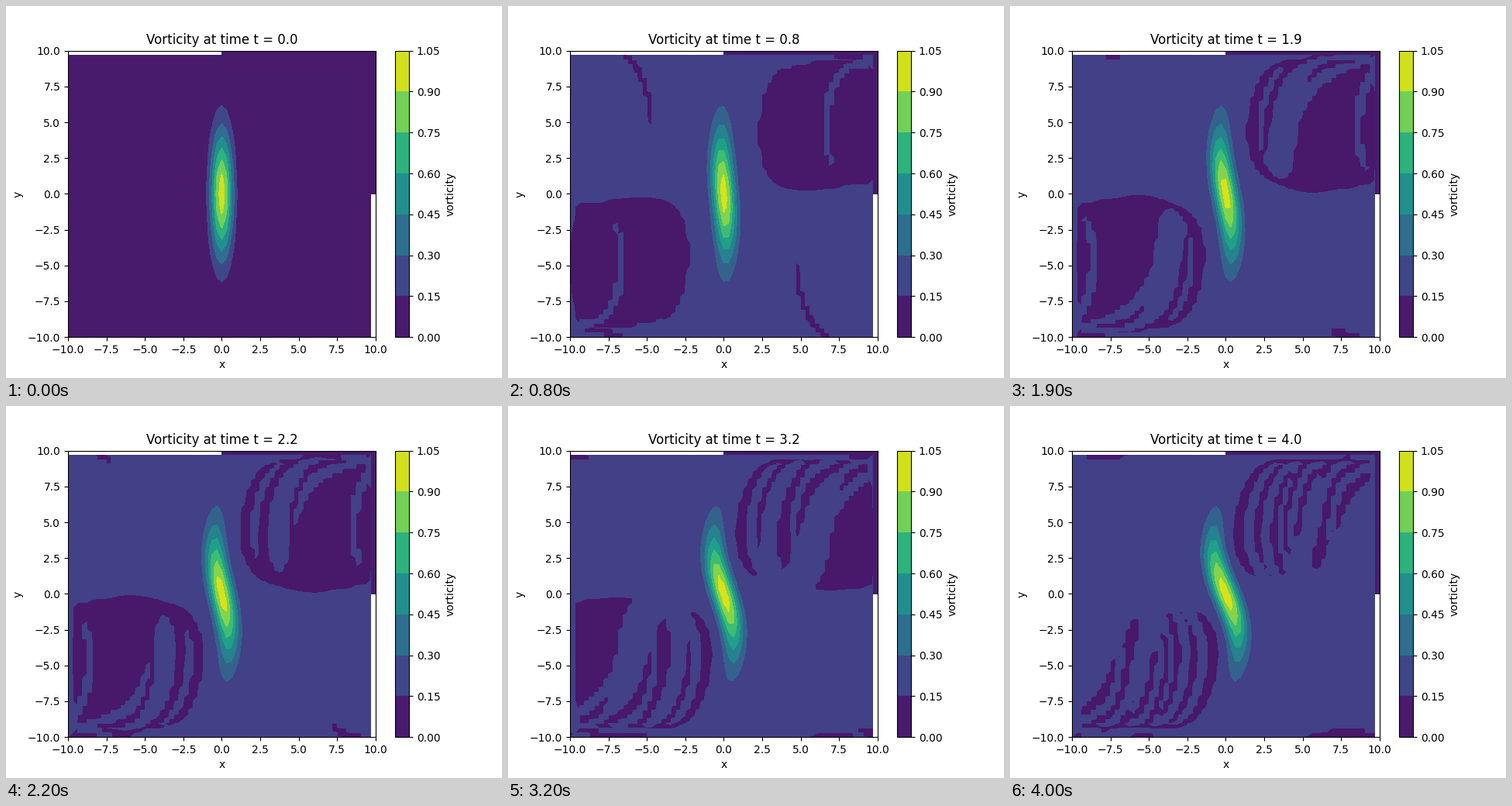
Animation of 640 by 480 pixels, one loop 4.1 s. Source, as a matplotlib script:

```python
import numpy as np
import matplotlib.pyplot as plt
from matplotlib.animation import FuncAnimation

N, SIZE, NU = 64, 20.0, 0.001
END, FRAMES = 4.0, 41
RTOL, ATOL = 1e-3, 1e-6
STEP = 0.15

# Periodic grid
d = SIZE / N
axis = np.linspace(-SIZE / 2, SIZE / 2, N + 1)[:N]
X, Y = np.meshgrid(axis, axis)
k = 2 * np.pi / SIZE * np.r_[0:N // 2, -N // 2:0]
KX, KY = np.meshgrid(k, k)
K2 = KX**2 + KY**2
K2[0, 0] = 1  # the mean of the stream function is arbitrary


def ddx(f):
    return (np.roll(f, -1, 1) - np.roll(f, 1, 1)) / (2 * d)


def ddy(f):
    return (np.roll(f, -1, 0) - np.roll(f, 1, 0)) / (2 * d)


def laplacian(f):
    near = sum(np.roll(f, s, a) for a in (0, 1) for s in (-1, 1))
    return (near - 4 * f) / d**2


def rhs(w):
    """Vorticity equation, with the stream function from an FFT solve."""
    psi = np.real(np.fft.ifft2(-np.fft.fft2(w) / K2))
    return NU * laplacian(w) + ddx(w) * ddy(psi) - ddx(psi) * ddy(w)


# Dormand-Prince 5(4) tableau, error weights and dense output
A = [
    [1/5],
    [3/40, 9/40],
    [44/45, -56/15, 32/9],
    [19372/6561, -25360/2187, 64448/6561, -212/729],
    [9017/3168, -355/33, 46732/5247, 49/176, -5103/18656],
    [35/384, 0, 500/1113, 125/192, -2187/6784, 11/84],
]
E = np.array([-71/57600, 0, 71/16695, -71/1920, 17253/339200, -22/525, 1/40])
P = np.array([
    [1, -8048581381/2820520608, 8663915743/2820520608,
     -12715105075/11282082432],
    [0, 0, 0, 0],
    [0, 131558114200/32700410799, -68118460800/10900136933,
     87487479700/32700410799],
    [0, -1754552775/470086768, 14199869525/1410260304,
     -10690763975/1880347072],
    [0, 127303824393/49829197408, -318862633887/49829197408,
     701980252875/199316789632],
    [0, -282668133/205662961, 2019193451/616988883, -1453857185/822651844],
    [0, 40617522/29380423, -110615467/29380423, 69997945/29380423],
])


def rms(f):
    return np.sqrt(np.mean(f**2))


def combine(weights, stages):
    return np.tensordot(weights, stages, 1)


def first_step(w, f):
    scale = ATOL + RTOL * np.abs(w)
    d0, d1 = rms(w / scale), rms(f / scale)
    h0 = 0.01 * d0 / d1
    d2 = rms((rhs(w + h0 * f) - f) / scale) / h0
    return min(100 * h0, (0.01 / max(d1, d2)) ** 0.2)


def solve(w, times):
    """Adaptive integration, sampled at the given times."""
    out, t, f = [], 0.0, rhs(w)
    h = first_step(w, f)
    while t < END:
        rejected = False
        while True:
            t_new = min(t + h, END)
            h = t_new - t
            stages = [f]
            for row in A:
                w_new = w + h * combine(row, np.array(stages))
                stages.append(rhs(w_new))
            stages = np.array(stages)
            scale = ATOL + RTOL * np.maximum(np.abs(w), np.abs(w_new))
            err = rms(h * combine(E, stages) / scale)
            if err < 1:
                break
            h *= max(0.2, 0.9 * err**-0.2)
            rejected = True
        while len(out) < len(times) and times[len(out)] <= t_new:
            s = (times[len(out)] - t) / h
            out.append(w + h * combine(P @ s ** np.arange(1, 5), stages))
        grow = min(10, 0.9 * err**-0.2) if err > 0 else 10
        t, w, f = t_new, w_new, stages[-1]
        h *= min(1, grow) if rejected else grow
    return out


times = np.linspace(0, END, FRAMES)
start = np.exp(-2 * X**2 - Y**2 / 20)
fields = solve(start, times)

fig, ax = plt.subplots(figsize=(6.4, 4.8), dpi=100)

# Fixed layer in index coordinates: fills the corner and feeds the colorbar
base = ax.contourf(start, levels=np.arange(8) * STEP)
fig.colorbar(base, ax=ax, label="vorticity")
ax.set(xlim=(-10, 10), ylim=(-10, 10), xlabel="x", ylabel="y")
layers = []


def draw(n):
    while layers:
        layers.pop().remove()
    w = fields[n]
    low = -1 if w.min() < 0 else 0
    layers.append(ax.contourf(X, Y, w, levels=np.arange(low, 8) * STEP))
    ax.set_title(f"Vorticity at time t = {times[n]:.1f}")
    return layers


anim = FuncAnimation(fig, draw, frames=FRAMES, interval=100, repeat=True,
                     repeat_delay=0, blit=False)
plt.show()
```
